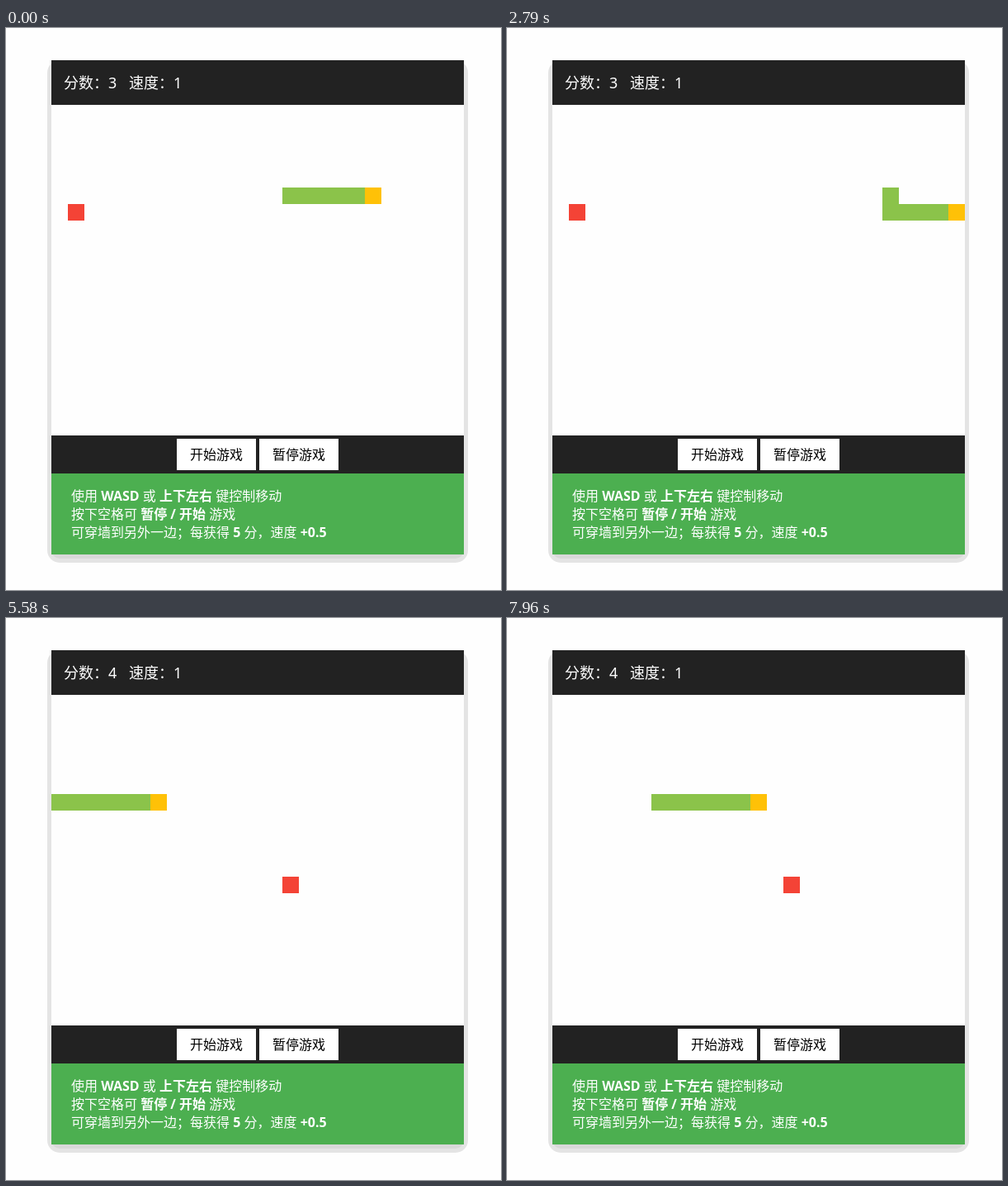
Recreate the animation shown at these times as an HTML page with a canvas. Size 600 by 680 pixels, loop 8 s.

```html
<!DOCTYPE html>
<html lang="zh-CN">
<head>
<meta charset="utf-8">
<title>贪吃蛇</title>
<style>
  html, body { margin: 0; width: 100%; height: 100%; overflow: hidden; background: #fefefe; }
  .stage { position: relative; width: 600px; height: 680px; overflow: hidden; }
  .stage > * { position: absolute; }
  .shadow {
    left: 55px; top: 39px; width: 500px; height: 598px; border-radius: 10px;
    box-shadow: 0 5px 0 rgba(0, 0, 0, .05), 0 5px 0 5px rgba(0, 0, 0, .1);
  }
  .bar { left: 55px; width: 500px; background: #222; }
  .head { top: 39px; height: 54px; }
  .tools { top: 493px; height: 46px; }
  .help { top: 539px; height: 98px; background: #4caf50; }
  .button { top: 497px; width: 96px; height: 38px; background: #fff; }
  canvas { left: 55px; top: 93px; }
  svg { left: 0; top: 0; }
  text { font: 16px "Noto Sans", "Noto Sans CJK SC", sans-serif; fill: #fff; }
  .big { font-size: 18px; }
  .dark { fill: #000; }
  .b { font-weight: 700; }
</style>
</head>
<body>
<div class="stage">
  <div class="shadow"></div>
  <div class="bar head"></div>
  <canvas id="board" width="500" height="400"></canvas>
  <div class="bar tools"></div>
  <div class="button" style="left:207px"></div>
  <div class="button" style="left:307px"></div>
  <div class="bar help"></div>
  <svg width="600" height="680">
    <text class="big" x="70" y="73">分数：<tspan id="score">3</tspan></text>
    <text class="big" x="149" y="73">速度：1</text>
    <text class="dark" x="223" y="522">开始游戏</text>
    <text class="dark" x="323" y="522">暂停游戏</text>
    <text x="79" y="572">使用 <tspan class="b">WASD</tspan> 或 <tspan class="b">上下左右</tspan> 键控制移动</text>
    <text x="79" y="594">按下空格可 <tspan class="b">暂停 / 开始</tspan> 游戏</text>
    <text x="79" y="616">可穿墙到另外一边；每获得 <tspan class="b">5</tspan> 分，速度 <tspan class="b">+0.5</tspan></text>
  </svg>
</div>
<script>
  const LOOP = 8000, CELL = 20, COLS = 25, EAT_STEP = 8;
  const steps = [880, 1220, 1590, 2060, 2420, 2790, 3160, 3650, 3970, 4340,
                 4840, 5210, 5580, 6040, 6380, 6750, 7120, 7610, 7960];
  const ctx = document.getElementById('board').getContext('2d');
  const score = document.getElementById('score');
  let shown = -1;

  // The snake runs right along row 5, drops to row 6 and wraps at the wall.
  const pathCell = i => i < 7 ? [14 + i, 5] : [(13 + i) % COLS, 6];

  function fillCell([col, row], color) {
    ctx.fillStyle = color;
    ctx.fillRect(col * CELL, row * CELL, CELL, CELL);
  }

  function draw(step) {
    const head = 5 + step;
    const eaten = step >= EAT_STEP;
    const size = step > EAT_STEP ? 7 : 6;   // grows one move after eating
    ctx.fillStyle = '#fefefe';
    ctx.fillRect(0, 0, 500, 400);
    fillCell(eaten ? [14, 11] : [1, 6], '#f44336');
    for (let i = head - size + 1; i < head; i++) fillCell(pathCell(i), '#8bc34a');
    fillCell(pathCell(head), '#ffc107');
    score.textContent = eaten ? 4 : 3;
  }

  function tick() {
    const time = performance.now() % LOOP;
    const step = steps.filter(t => t <= time).length;
    if (step !== shown) draw(shown = step);
    requestAnimationFrame(tick);
  }
  tick();
</script>
</body>
</html>
```
